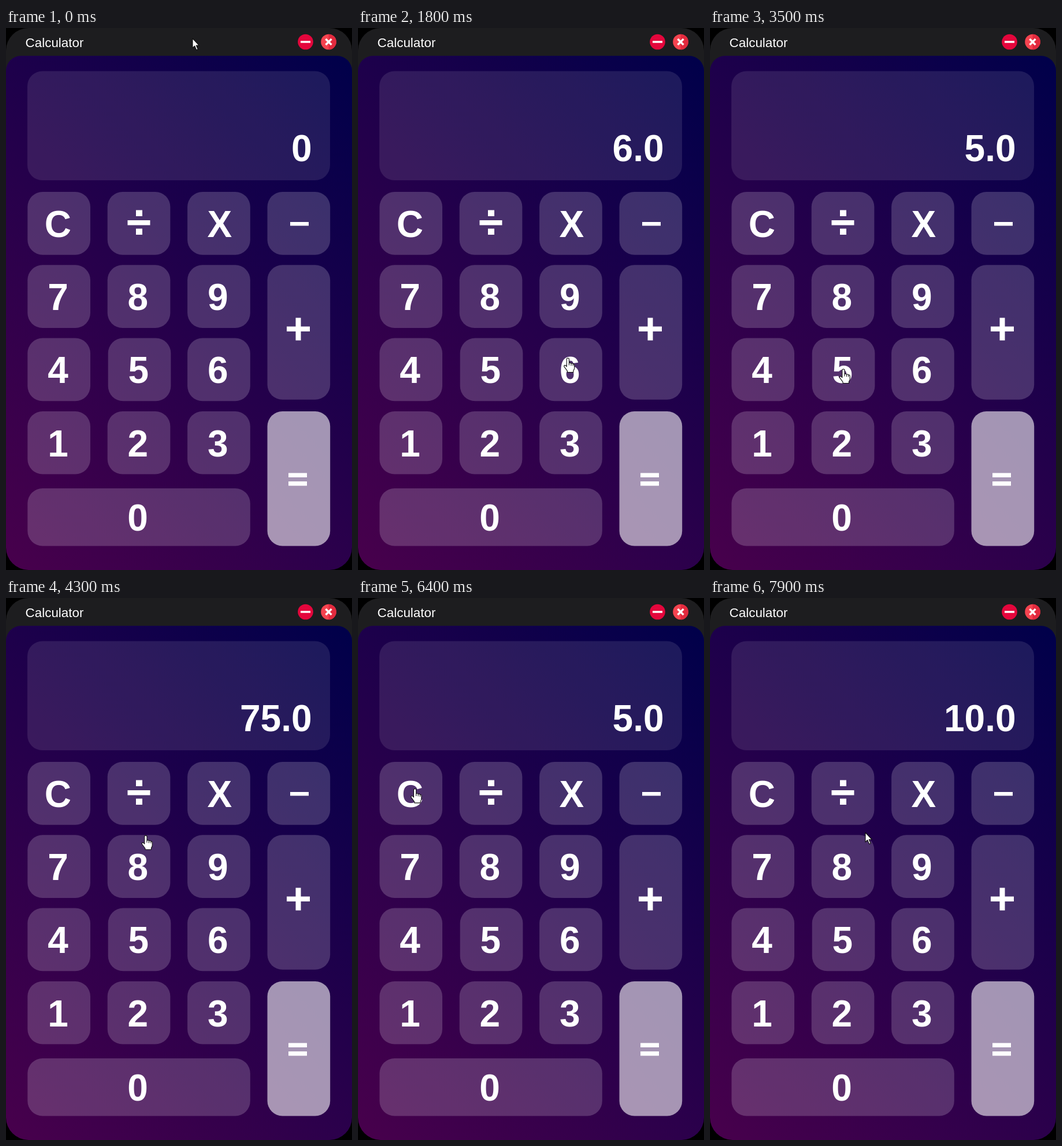
Animation of 599 by 936 pixels, one loop 8000 ms. Source, as an HTML page:

```html
<!DOCTYPE html>
<html lang="en">
<head>
<meta charset="utf-8">
<title>Calculator</title>
<style>
html, body { margin: 0; width: 100%; height: 100%; overflow: hidden; background: #000; }
svg { display: block; width: 599px; height: 936px; }
text { fill: #fff; font-family: "Liberation Sans", Arial, sans-serif; }
.big { font-size: 64px; font-weight: bold; text-anchor: middle; }
#cursor path { fill: #fff; stroke: #111; stroke-width: 1.1; stroke-linejoin: round; }
</style>
</head>
<body>
<svg viewBox="0 0 599 936">
  <defs>
    <linearGradient id="glow" gradientUnits="userSpaceOnUse" x1="0" y1="936" x2="743" y2="193">
      <stop stop-color="#48004c"/>
      <stop offset="1" stop-color="#00004a"/>
    </linearGradient>
    <clipPath id="frame"><rect width="599" height="936" rx="39"/></clipPath>
  </defs>
  <g clip-path="url(#frame)">
    <rect width="599" height="90" fill="#1d1d1f"/>
    <rect y="48" width="599" height="930" rx="26" fill="url(#glow)"/>
  </g>
  <text x="33.600" y="33" font-size="22.4">Calculator</text>

  <circle cx="518.5" cy="24" r="13.3" fill="#e4063c"/>
  <path d="M510 24h17" stroke="#fff" stroke-width="3.4"/>
  <circle cx="558.5" cy="24" r="13.3" fill="#f5434f"/>
  <path d="M558.5 10.7a13.3 13.3 0 0 1 0 26.6Z" fill="#e22a3e"/>
  <path d="M553.5 19l10 10m0-10l-10 10" stroke="#fff" stroke-width="3.4"/>

  <rect x="37" y="74.5" width="524" height="188.5" rx="26" fill="#fff" fill-opacity=".1"/>
  <text id="display" class="big" x="529.5" y="230" style="text-anchor:end">0</text>
  <g id="keys"></g>
  <g fill="#fff">
    <path d="M210.5 332h39v8.5h-39zm14.500-17.500h11v10.500h-11zm0 32h11v10.500h-11z"/>
    <path d="M492 335h32v6.5h-32z"/>
    <path d="M486 515.5h40v8.5h-40zM501.500 500.500h9v39h-9z"/>
    <path d="M489 768.5h32v7.5h-32zm0 14.500h32v7.5h-32z"/>
  </g>
  <g id="cursor">
    <path id="arrow" d="M0 0V16.5L3.7 13L6.6 19.8L9.2 18.7L6.3 12H11.3Z"/>
    <g id="hand" transform="translate(0 -1)">
      <path d="M-2.2 2.2a2.1 2.1 0 0 1 4.2 0V8.6q2.2-1.2 3.5.8q2-1 3.3.8q2.4-.4 2.4 2.2V17q0 2.8-1.8 4.7V24.500H-1V22.500L-6.500 15q-.8-2.200 1-2.600q1.600 0 3.300 2.400Z"/>
      <path d="M2 8.600v4M5.500 9.400v3.800M8.800 10.200v3.400"/>
    </g>
  </g>
</svg>
<script>
const $ = id => document.getElementById(id);
const LOOP = 8000, STEP = 100, DWELL = 100;
const SIZE = 108.7, LEFT = 37.3, TOP = 283, COL = 138.4, ROW = 126.3;

function add(tag, attrs, text = '') {
  const el = document.createElementNS('http://www.w3.org/2000/svg', tag);
  for (const name in attrs) el.setAttribute(name, attrs[name]);
  el.textContent = text;
  $('keys').append(el);
}

const buttons = {};
function button(key, x, y, w = SIZE, h = SIZE, opacity = .19) {
  buttons[key] = { x, y, w, h };
  add('rect', { x, y, width: w, height: h, rx: 26, fill: '#fff', 'fill-opacity': opacity });
}
const label = (key, x, y) => add('text', { x, y, class: 'big' }, key);

['C÷X', '789', '456', '123'].forEach((row, r) => [...row].forEach((key, c) => {
  const x = LEFT + c * COL + (key === '5'), y = TOP + r * ROW;
  button(key, x, y);
  if (key !== '÷') label(key, x + SIZE / 2 - (key === 'X' ? -1.5 : 1.7), y + 77.7);
}));
const right = LEFT + 3 * COL;
button('−', right, TOP);
button('+', right, TOP + ROW, SIZE, 232.5);
button('=', right, TOP + 3 * ROW, SIZE, 232.5, .585);
button('0', LEFT, 795, 385.5, 99.5);
label('0', 228, 867.5);

// The pointer's errand: time, key to press, offset from the key's centre
const presses = [
  [700, '9'], [1200, '+'], [1750, '6', -5, -19], [2650, '=', -3, -40],
  [3050, 'X'], [3500, '5'], [4000, '='], [4550, '÷'], [4950, '5'], [5450, '=', 16, -85],
  [5750, '−'], [6100, '5'], [6480, 'C', 7, -7], [6900, '1'], [7300, '0']
];

const stops = [{ t: 0, x: 323, y: 18 }];
for (const [time, key, dx = 0, dy = 0] of presses) {
  const b = buttons[key], x = b.x + b.w / 2 + dx, y = b.y + b.h / 2 + dy;
  if (key === '÷') stops.push({ t: 4300, x: 242, y: 411 });
  stops.push({ t: time - DWELL, x, y }, { t: time + DWELL, x, y });
}
stops.push({ t: LOOP - STEP, x: 269, y: 405 });

function pointerAt(t) {
  const i = stops.findIndex(s => s.t >= t) || 1;
  const a = stops[i - 1], b = stops[i];
  const u = (t - a.t) / (b.t - a.t), k = u * u * (3 - 2 * u);
  return { x: a.x + (b.x - a.x) * k, y: a.y + (b.y - a.y) * k };
}

const apply = {
  '+': (a, b) => a + b, '−': (a, b) => a - b,
  'X': (a, b) => a * b, '÷': (a, b) => a / b
};

// Replays the key presses made so far and returns the readout
function readoutAt(t) {
  let value = 0, stored = 0, op = '', fresh = true, text = '0';
  for (const [time, key] of presses) {
    if (time > t) break;
    if (/\d/.test(key)) {
      value = fresh ? +key : value * 10 + +key;
      fresh = false;
    } else {
      fresh = true;
      if (key === 'C') value = 0;
      else if (key === '=') value = apply[op](stored, value);
      else [stored, op] = [value, key];
    }
    text = key === 'C' ? '0' : value.toFixed(1);
  }
  return text;
}

function draw() {
  const t = Math.floor(performance.now() % LOOP / STEP) * STEP;
  const { x, y } = pointerAt(t);
  const over = Object.values(buttons).some(b =>
    x >= b.x && x <= b.x + b.w && y >= b.y && y <= b.y + b.h);
  $('cursor').setAttribute('transform', `translate(${x} ${y})`);
  $('hand').style.display = over ? '' : 'none';
  $('arrow').style.display = over ? 'none' : '';
  $('display').textContent = readoutAt(t);
  requestAnimationFrame(draw);
}
draw();
</script>
</body>
</html>
```
